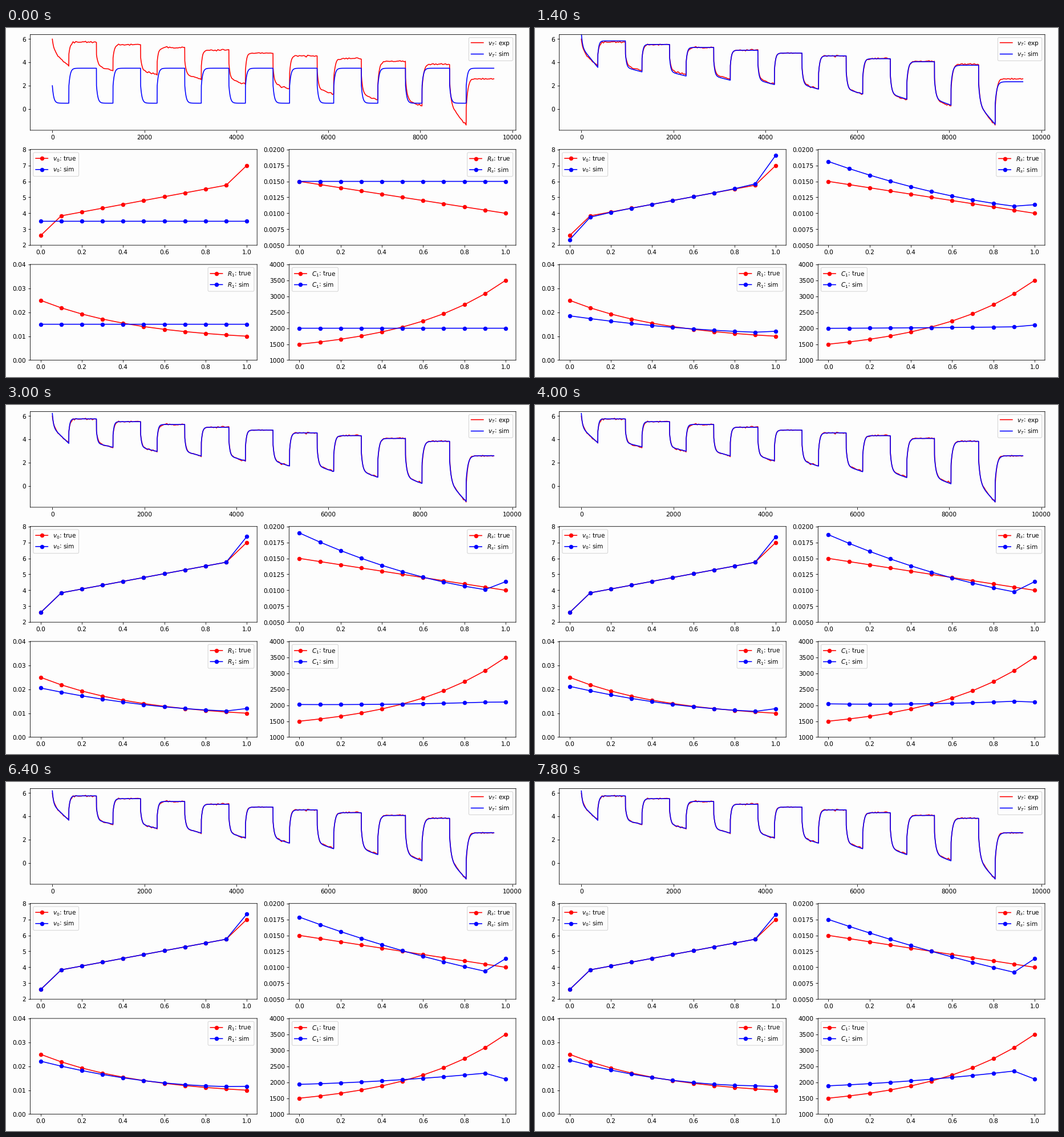
Animation of 917 by 611 pixels, one loop 8000 ms. Source, as a matplotlib script:

```python
import numpy as np
import matplotlib.pyplot as plt
from matplotlib.animation import FuncAnimation

W, H, DPI = 917, 611, 76.4
PAPER = "#fdfdfd"
STEPS, INTERVAL = 40, 200

plt.rcParams.update({
    "font.family": "DejaVu Sans",
    "text.hinting": "none",
    "path.snap": False,
    "figure.facecolor": PAPER,
    "axes.facecolor": PAPER,
})

# Pulsed discharge: 360 s at 100 A, then 600 s of rest, ten times.
DT, PULSE, CYCLE, AMPS = 2, 360, 960, 100
t = np.arange(0, 10 * CYCLE + DT, DT)
current = np.where((t % CYCLE < PULSE) & (t < 10 * CYCLE), AMPS, 0)
used = np.concatenate([[0], np.cumsum(current[:-1]) * DT])
charge = np.clip(1 - used / (10 * PULSE * AMPS), 0, 1)

soc = np.linspace(0, 1, 11)
cell = np.minimum((charge * 10).astype(int), 9)
frac = charge * 10 - cell


def along(nodes):
    """Spread node values (rows x 11) over the time axis."""
    return nodes[:, cell] * (1 - frac) + nodes[:, cell + 1] * frac


def terminal_voltage(v0, rs, r1, c1):
    v0, rs, r1, c1 = (along(np.atleast_2d(p)) for p in (v0, rs, r1, c1))
    gain = 1 - np.exp(-DT / (r1 * c1))
    drop = np.zeros_like(v0)
    for k in range(len(t) - 1):
        goal = current[k] * r1[:, k]
        drop[:, k + 1] = drop[:, k] + (goal - drop[:, k]) * gain[:, k]
    return v0 - rs * current - drop


# True cell parameters
v0_true = 3.6 + 2.4 * soc
v0_true[0] -= 1
v0_true[-1] += 1
rs_true = 0.015 - 0.005 * soc
r1_true = 0.01 + 0.015 * (np.exp(-2 * soc) - np.exp(-2)) / (1 - np.exp(-2))
c1_true = 1500 + 2000 * (np.exp(2 * soc) - 1) / (np.exp(2) - 1)

rng = np.random.default_rng(4)
knots = np.arange(0, t[-1] + 30, 30)
noise = np.interp(t, knots, rng.normal(0, 0.035, len(knots)))
noise[0] = 0
v_exp = terminal_voltage(v0_true, rs_true, r1_true, c1_true)[0] + noise

# The fit: each parameter is a parabola over the charge that drifts
# through a few stages, fast at first and then ever slower.
STAGES = np.log1p([0, 4, 11, 20, 39])
offset = soc - 0.5


def ease(*values):
    pace = np.log1p(np.arange(STEPS))
    return np.interp(pace, STAGES[:len(values)], values)[:, None]


def parabola(mid, tilt, bend, full):
    fit = ease(*mid) + ease(*tilt) * offset + ease(*bend) * offset ** 2
    fit[:, -1:] = ease(*full)
    return fit


v0_fit = v0_true + (3.5 - v0_true) * ease(1, 0)
v0_fit += 18 * offset ** 5 * ease(0, 1, 0)
v0_fit[:, -1:] += ease(0, 0.4, 0.37, 0.36, 0.32)

rs_fit = 1e-5 * parabola(mid=(1500, 1384, 1302, 1284, 1250),
                         tilt=(0, -537, -910, -950, -900),
                         bend=(0, 103, 681, 450, 200),
                         full=(1500, 1135))
r1_fit = 1e-5 * parabola(mid=(1500, 1398, 1347, 1368, 1413),
                         tilt=(0, -502, -890, -1075, -1064),
                         bend=(0, 231, 744, 875, 1228),
                         full=(1500, 1210, 1203, 1190, 1150))
c1_fit = parabola(mid=(2000, 2008, 2026, 2048, 2095),
                  tilt=(0, 30, 75, 110, 540),
                  bend=(0, 0, 50, 200, 250),
                  full=(2000, 2100))

fits = [v0_fit, rs_fit, r1_fit, c1_fit]
v_sim = terminal_voltage(*fits)

# The tiny excess keeps the pixel size from rounding down.
fig = plt.figure(figsize=((W + 1e-4) / DPI, (H + 1e-4) / DPI), dpi=DPI)


def panel(place, x, fixed, moving, name, ref, ylim, loc, marker=None):
    """Draw a red reference and a blue estimate; return the blue line."""
    ax = fig.add_subplot(place)
    ax.plot(x, fixed, "r", marker=marker, label=f"${name}$: {ref}")
    line, = ax.plot(x, moving, "b", marker=marker, label=f"${name}$: sim")
    ax.set_ylim(ylim)
    ax.legend(loc=loc)
    return line


volt_line = panel(311, t, v_exp, v_sim[0], "v_T", "exp",
                  (-1.82, 6.39), "upper right")

SPECS = [
    (323, v0_true, "v_0", (2, 8), "upper left"),
    (324, rs_true, "R_s", (0.005, 0.02), "upper right"),
    (325, r1_true, "R_1", (0, 0.04), "upper right"),
    (326, c1_true, "C_1", (1000, 4000), "upper left"),
]
fit_lines = [
    panel(place, soc, true, fit[0], name, "true", ylim, loc, "o")
    for (place, true, name, ylim, loc), fit in zip(SPECS, fits)
]
fig.tight_layout()


def update(i):
    volt_line.set_ydata(v_sim[i])
    for line, fit in zip(fit_lines, fits):
        line.set_ydata(fit[i])
    return [volt_line, *fit_lines]


anim = FuncAnimation(fig, update, frames=STEPS, interval=INTERVAL,
                     repeat=True, repeat_delay=0, blit=False)
plt.show()
```
